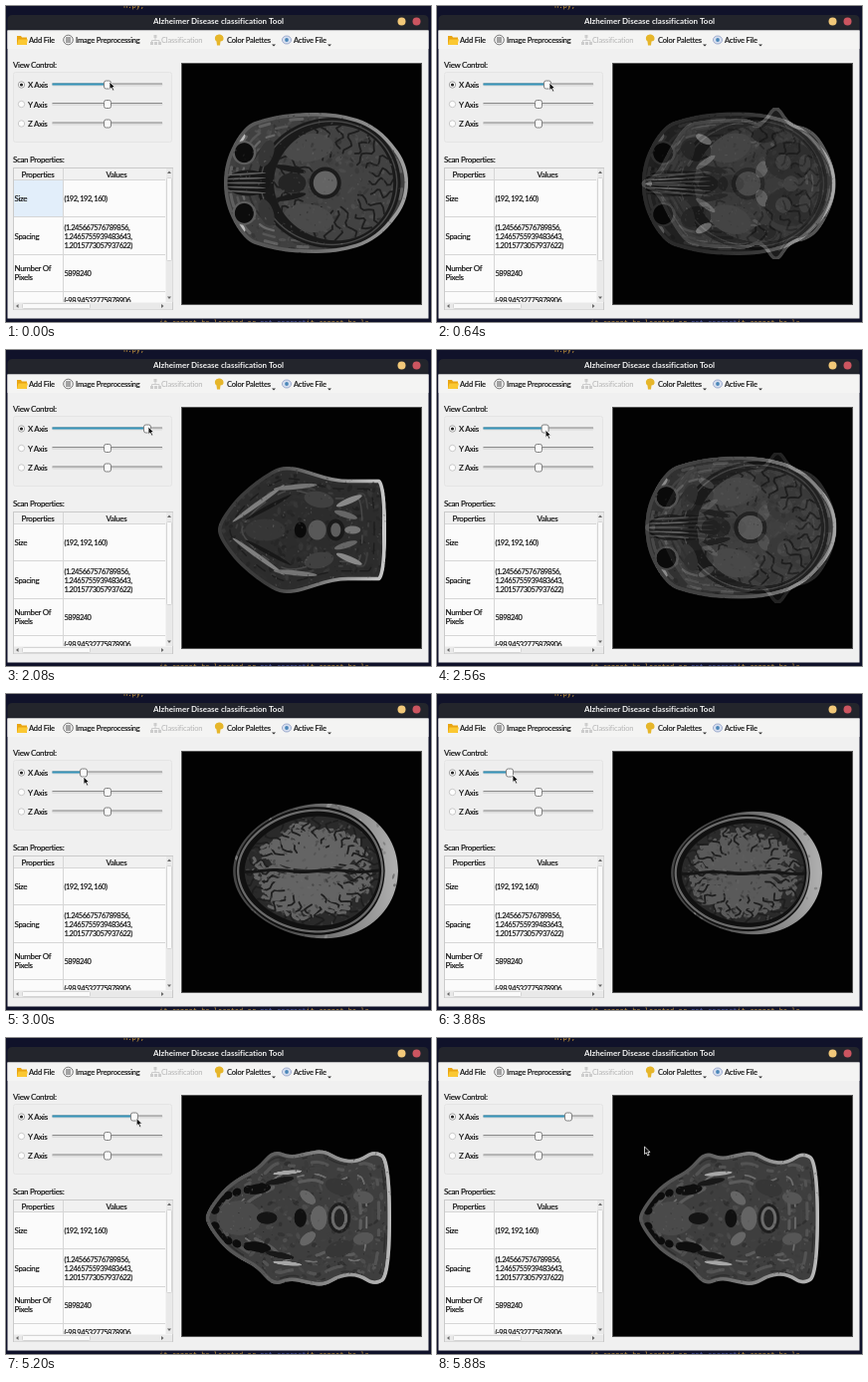
An HTML page with a canvas for the animation above (5.92 s loop, 427 px wide and 317 px high).

```html
<!DOCTYPE html>
<html lang="en">
<head>
<meta charset="utf-8">
<title>Classification tool</title>
<style>
html, body { margin: 0; width: 100%; height: 100%; overflow: hidden; background: #0c0e1f; }
svg, canvas { position: absolute; left: 0; top: 0; display: block; }
#scan { left: 177px; top: 58px; }
text { font: 500 8px Lato, sans-serif; letter-spacing: -.35px; fill: #161616; stroke: #161616; stroke-width: .15px; white-space: pre; }
.bar text { font-size: 7.5px; letter-spacing: -.17px; }
.num text { font-size: 7.5px; letter-spacing: -.5px; }
.term text { font: 7px 'DejaVu Sans Mono', monospace; fill: #c9983c; stroke: none; letter-spacing: 0; }
text.title { font: bold 8px Lato, sans-serif; fill: #f4f4f4; stroke: none; letter-spacing: .03px; }
text.off { fill: #b9b9b9; stroke: none; }
</style>
</head>
<body>
<svg width="427" height="317" viewBox="0 0 427 317">
  <defs><clipPath id="cells"><rect x="8" y="163" width="152" height="134"/></clipPath></defs>

  <rect width="427" height="317" fill="#10122a"/>
  <g class="term">
    <text x="118" y="2">n.py;</text>
    <text x="154" y="319.500">it cannot be located or<tspan fill="#5560b0"> not correct</tspan>it cannot be lo</text>
  </g>

  <path d="M1.500 26V14q0-5 5-5H419.500q5 0 5 5V26z" fill="#23252c"/>
  <rect x="1.500" y="24.500" width="423" height="289" fill="#f0f0f0"/>
  <text class="title" x="213.500" y="18.300" text-anchor="middle">Alzheimer Disease classification Tool</text>
  <circle cx="397.500" cy="15.500" r="4" fill="#f2c879"/>
  <circle cx="412.500" cy="15.500" r="4" fill="#cc5560"/>

  <g class="bar">
    <rect x="1.500" y="24.500" width="423" height="18.500" fill="#f4f4f3"/>
    <path d="M11 30h4l1 1.500h5v7.500h-10z" fill="#e9a512"/>
    <path d="M11 39l1.500-5.500h9.500l-1.500 5.500z" fill="#fbc832"/>
    <text x="23" y="37.300">Add File</text>
    <circle cx="62.500" cy="34" r="4.800" fill="#f2f2f2" stroke="#777"/>
    <path d="M60 32h5M60 34h5M60 36h5" stroke="#555"/>
    <text x="70" y="37.300">Image Preprocessing</text>
    <path d="M150 30v4M146.500 37.500v-3h7.500v3" fill="none" stroke="#cdcdcd"/>
    <path d="M148.500 29h3v3h-3zM145 36h3v3h-3zM149 36h3v3h-3zM153 36h3v3h-3z" fill="#cdcdcd"/>
    <text class="off" x="156" y="37.300">Classification</text>
    <path d="M210 31q1-3 5-2.500q4 1 3.500 5q-.5 2-3 2l-.5 4h-3l-.5-4q-2-1-1.500-4.500z" fill="#e6b62a"/>
    <text x="222" y="37.300">Color Palettes</text>
    <path d="M267 38.500h4l-2 2zM323 38.500h4l-2 2z" fill="#333"/>
    <ellipse cx="282" cy="34" rx="4.500" ry="4" fill="#d8e0f0" stroke="#8c9cc4" stroke-width=".8"/>
    <circle cx="282" cy="34" r="1.900" fill="#4a86b8"/>
    <text x="289" y="37.300">Active File</text>
  </g>

  <text x="7" y="62.300">View Control:</text>
  <rect x="7.500" y="66.500" width="159" height="70" rx="2" fill="#eee" stroke="#e4e4e4"/>
  <g id="axes"></g>

  <text x="7" y="157">Scan Properties:</text>
  <rect x="7.500" y="162.500" width="160" height="142" fill="#fbfbfb" stroke="#cacaca"/>
  <rect x="8" y="163" width="152" height="11.500" fill="#f1f1f1"/>
  <rect id="pick" x="8" y="175" width="49" height="36.500" fill="#e2eefa"/>
  <g clip-path="url(#cells)">
    <path d="M8 174.500H160M8 211.500H160M8 249.500H160M8 286.500H160M57.500 163V297M160.500 163V297" stroke="#d6d6d6"/>
    <text x="15.500" y="171.500">Properties</text>
    <text x="100.500" y="171.500">Values</text>
    <text x="8.500" y="195.800">Size</text>
    <text x="8.500" y="233.600">Spacing</text>
    <text x="8.500" y="266">Number Of</text>
    <text x="8.500" y="275.300">Pixels</text>
    <g class="num">
      <text x="58.500" y="195.800">(192, 192, 160)</text>
      <text x="58.500" y="224.800">(1.245667576789856,</text>
      <text x="58.500" y="234">1.2465755939483643,</text>
      <text x="58.500" y="243.200">1.2015773057937622)</text>
      <text x="58.500" y="270.800">5898240</text>
      <text x="58.500" y="298">(-98.94532775878906,</text>
    </g>
  </g>
  <path d="M160.500 163h7v134h-7zM8 297.500h159v7H8z" fill="#e9e9e9"/>
  <rect x="161.500" y="172.500" width="5" height="83" rx="1" fill="#fafafa" stroke="#d4d4d4"/>
  <rect x="16.500" y="298.500" width="68" height="5" rx="1" fill="#fafafa" stroke="#d4d4d4"/>
  <path d="M162 168l2-2.500 2 2.500zM162 291.500l2 2.500 2-2.500zM12.500 299l-2.500 2 2.500 2zM156 299l2.500 2-2.500 2z" fill="#666"/>
  <rect x="176.500" y="57.500" width="241" height="242" stroke="#555"/>
</svg>
<canvas id="scan" width="240" height="241"></canvas>
<svg id="arrow" width="9" height="12" viewBox="-1 -1 9 12">
  <path d="M0 0V7.500L1.800 6 3.200 9 4.600 8.400 3.300 5.500H5.600Z" fill="#111" stroke="#f2f2f2" stroke-width=".8"/>
</svg>
<script>
const LOOP = 5920, STEP = 40, LEFT = 177, TOP = 58, RES = 2, PAD = 4, TAU = Math.PI * 2;
const byId = id => document.getElementById(id);
const mix = (a, b, k) => a + (b - a) * k;
const clamp = k => Math.min(1, Math.max(0, k));

byId('axes').innerHTML = ['X', 'Y', 'Z'].map((name, i) => `
  <g transform="translate(0 ${79 + i * 19.5})">
    <circle cx="15.500" r="3.200" fill="#fdfdfd" stroke="${i ? '#c4c4c4' : '#999'}" stroke-width=".9"/>
    <circle cx="15.500" r="1.600" fill="${i ? 'none' : '#222'}"/>
    <text x="22" y="3">${name} Axis</text>
    <rect x="46" y="-1.500" width="111.500" height="3" rx="1.500" fill="#dcdcdc"/>
    <path d="M46.500 -1H157" stroke="#8a8a8a"/>
    <path class="fill" d="M46.500 -.5h${i ? 0 : 55}" stroke="#3593b8" stroke-width="2"/>
    <rect class="knob" x="98.500" y="-4" width="7" height="8" rx="2" fill="#fafafa" stroke="#808080"/>
  </g>`).join('');

// Drawing space of one slice: x from 0 to w, y from -h/2 to h/2
let g, w, h, seed;
function rnd(a, b) {
  seed = (seed * 16807) % 2147483647;
  return mix(a, b, seed / 2147483647);
}
const gray = v => `rgb(${v | 0},${v | 0},${v | 0})`;
function fade(v0, v1) {
  const c = g.createLinearGradient(0, 0, w, 0);
  c.addColorStop(.3, gray(v0));
  c.addColorStop(1, gray(v1));
  return c;
}
const ink = c => typeof c === 'number' ? gray(c) : c;
function fill(p, c) { g.fillStyle = ink(c); g.fill(p); }
function line(p, c, width) { g.strokeStyle = ink(c); g.lineWidth = width; g.stroke(p); }
function inside(p, f) { g.save(); g.clip(p); f(); g.restore(); }
function pair(f) {
  f();
  g.save();
  g.scale(1, -1);
  f();
  g.restore();
}
function smooth(pts) {
  const p = new Path2D(), n = pts.length;
  const mid = i => [0, 1].map(d => (pts[i % n][d] + pts[(i + 1) % n][d]) / 2);
  p.moveTo(...mid(0));
  for (let i = 1; i <= n; i++) p.quadraticCurveTo(...pts[i % n], ...mid(i));
  p.closePath();
  return p;
}
// Mirrored outline from half heights at even steps
function outline(prof, inset = 0) {
  const n = prof.length - 1;
  const top = prof.map((v, i) => [mix(inset, w - inset, i / n), -v * (h / 2 - inset)]);
  return smooth([...top, ...top.map(([x, y]) => [x, -y]).reverse()]);
}
function egg(u0, u1, v, taper = .1) {
  const rx = (u1 - u0) * w / 2, pts = [];
  for (let a = 0; a < TAU; a += TAU / 48) {
    pts.push([u0 * w + rx + rx * Math.cos(a), v * h / 2 * Math.sin(a) * (1 + taper * Math.cos(a))]);
  }
  return smooth(pts);
}
function oval(x, y, rx, ry, c, turn = 0) {
  const p = new Path2D();
  p.ellipse(x, y, rx, ry, turn, 0, TAU);
  fill(p, c);
}
const core = (u, rx, ry, c) => oval(u * w, 0, rx, ry, c);
const twin = (u, v, rx, ry, c, turn) => pair(() => oval(u * w, -v * h / 2, rx, ry, c, turn));

function grain(n, lo, hi, size) {
  g.globalAlpha = .5;
  for (let i = 0; i < n; i++) {
    oval(rnd(0, w), rnd(-h, h) / 2, rnd(.5, 1.6) * size, rnd(.4, .9) * size, rnd(lo, hi), rnd(0, 3));
  }
  g.globalAlpha = 1;
}
// Broken bands that follow the outline
function layers(prof, from, gap, n, lo, hi) {
  for (let i = 0; i < n; i++) {
    g.setLineDash([rnd(6, 26), rnd(6, 18), rnd(3, 12), rnd(8, 30)]);
    line(outline(prof, from + i * gap), rnd(lo, hi), rnd(1.2, 3.2));
  }
  g.setLineDash([]);
}
// Wavy radial furrows, with optional bright fingers between them
function furrows(u0, u1, v, n, tone) {
  const cx = (u0 + u1) * w / 2, rx = (u1 - u0) * w / 2, ry = v * h / 2;
  const ray = (a, from, to, c, width) => {
    const p = new Path2D();
    for (let k = 0; k <= 1; k += .125) {
      const r = mix(from, to, k), b = a + .08 * Math.sin(k * 10 + a * 7);
      p.lineTo(cx + rx * r * Math.cos(b), ry * r * Math.sin(b));
    }
    line(p, c, width);
  };
  for (let i = 0; i < n; i++) {
    const a = (i + rnd(.35, .65)) * TAU / n, end = rnd(.76, .9);
    if (tone) {
      ray(a, .3, end, tone, 4);
      ray(a + .1, end - .15, end + .03, tone, 3);
    }
    ray(a + TAU / n / 2, rnd(.4, .68), 1, 28, 1.8);
  }
}

function crown(n, tone) {
  const brain = egg(.07, .885, .81);
  fill(egg(0, 1, 1), fade(70, 175));
  inside(egg(0, 1, 1), () => grain(160, 60, 190, 2));
  fill(egg(.015, .92, .95), 14);
  line(egg(.03, .905, .9), 105, 2.2);
  fill(brain, 40);
  inside(brain, () => {
    twin(.47, .3, w * .27, h * .14, tone);
    furrows(.07, .885, .81, n, tone);
    grain(420, 26, 112, 1.5);
    const p = new Path2D();
    for (let x = 0; x < w; x += 4) p.lineTo(x, Math.sin(x / 9));
    line(p, 20, 3);
  });
}

// Soft tissue shared by the lower slices
function tissue(prof, base, rim, f) {
  const skin = outline(prof);
  fill(skin, base);
  inside(skin, () => {
    grain(380, base * .5, base * 1.6, 2.6);
    layers(prof, 6, 6, 5, base * .6, base * 2);
    f();
    line(skin, fade(base * 1.4, rim), 7);
    grain(330, 20, 120, .9);
  });
}

function eyeLevel() {
  tissue([.3, .82, .92, .98, 1, 1, .96, .87, .66, .25], 62, 160, () => {
    fill(egg(.18, .96, .93, .04), 24);
    line(egg(.2, .94, .88, .04), 70, 1.4);
    const brain = egg(.27, .92, .82, .05);
    fill(brain, 64);
    inside(brain, () => {
      grain(300, 40, 92, 2.8);
      furrows(.27, .92, .82, 26);
      twin(.46, .5, 25, 14, 72, -.15);
      twin(.36, .2, 16, 3, 24, .2);
      grain(160, 44, 92, 1.6);
      core(.37, 14, 10, 34);
      core(.55, 16, 16, 26);
      core(.55, 12, 12, 98);
    });
    twin(.08, .62, 8, 4, 185, -.7);
    twin(.11, .43, 12, 12, 92);
    twin(.11, .43, 9.5, 10, 10);
    twin(.23, .42, 7, 14, 52, .35);
    core(.13, 22, 13, 22);
    for (let y = -9; y <= 9; y += 4.5) oval(w * .12, y, 20, .9, 95, y / 150);
  });
}

function noseLevel() {
  const prof = [.04, .12, .55, .84, .88, .9, .9, .92, .82, 1.15, .82, .8, .64, .2];
  tissue(prof, 48, 175, () => {
    twin(.28, .48, 16, 12, 20, .2);
    twin(.46, .5, 22, 14, 60, -.35);
    twin(.32, .62, 9, 4, 165, .5);
    twin(.33, .3, 12, 3, 135, -.6);
    twin(.63, .68, 13, 8, 18);
    twin(.62, .2, 6, 9, 118, .4);
    twin(.76, .32, 25, 20, 26);
    twin(.73, .3, 8, 8, 60);
    twin(.84, .28, 6, 9, 56);
    core(.22, 36, 13, 18);
    for (let y = -9; y <= 9; y += 3.6) oval(w * .19, y, 34, .9, 92, y / 90);
    core(.02, 7, 5, 170);
    core(.46, 14, 9, 30);
    core(.77, 8, 8, 62);
  });
}

function mouthLevel() {
  const prof = [.08, .42, .6, .72, 1, .9, .96, 1, .86, .84, 1, .85];
  tissue(prof, 60, 185, () => {
    core(.18, 22, 17, 72);
    for (let k = .06; k < 1; k += .15) {
      twin(.05 + .27 * k * k, .46 * Math.sqrt(k), 4.5, 3.8, 10, -.6);
    }
    twin(.28, .42, 13, 5, 12, -.15);
    twin(.44, .66, 14, 2, 165, -.1);
    twin(.4, .54, 14, 3, 22, -.2);
    twin(.55, .3, 9, 5, 100, .7);
    twin(.72, .45, 14, 8, 52, .3);
    twin(.85, .3, 10, 6, 84, .2);
    core(.33, 10, 6, 18);
    core(.51, 6, 9, 14);
    core(.61, 8, 12, 98);
    core(.72, 11, 15, 28);
    core(.72, 8, 12, 105);
    core(.72, 5, 9, 34);
  });
}

function neckLevel() {
  const prof = [.1, .45, .68, .86, 1, 1, .93, .85, .8, .8, .8, .8];
  tissue(prof, 42, 200, () => {
    twin(.24, .42, 32, 2.2, 125, -.62);
    twin(.3, .36, 26, 2, 22, -.5);
    twin(.46, .68, 22, 2.5, 115, -.1);
    twin(.6, .48, 15, 8, 62, .2);
    twin(.78, .46, 14, 3, 135, -.4);
    twin(.76, .24, 12, 3, 100, .3);
    core(.28, 20, 11, 52);
    core(.49, 6, 8, 8);
    core(.59, 9, 10, 86);
    core(.7, 9, 11, 24);
    core(.7, 5, 7, 92);
    core(.8, 8, 4, 115);
    oval(w, 0, 4, h * .42, 205);
  });
}

const slices = [
  { at: 73, box: [235, 118, 387, 241], draw: () => crown(26, 88) },
  { at: 78, box: [228, 110, 394, 245], draw: () => crown(30, 98) },
  { at: 102, box: [219, 107, 404, 248], draw: eyeLevel },
  { at: 119.5, box: [193, 106, 397, 252], draw: noseLevel },
  { at: 132, box: [203, 113, 384, 249], draw: mouthLevel },
  { at: 142, box: [213, 117, 382, 244], draw: neckLevel }
];
slices.forEach((s, i) => {
  const [x0, y0, x1, y1] = s.box;
  w = x1 - x0;
  h = y1 - y0;
  seed = 4127 + i * 977;
  s.img = document.createElement('canvas');
  s.img.width = (w + 2 * PAD) * RES;
  s.img.height = (h + 2 * PAD) * RES;
  g = s.img.getContext('2d');
  g.scale(RES, RES);
  g.translate(PAD, PAD + h / 2);
  g.lineCap = g.lineJoin = 'round';
  s.draw();
});

const view = byId('scan').getContext('2d');
function paint(img, alpha, [x0, y0, x1, y1]) {
  if (alpha <= 0) return;
  view.globalAlpha = alpha;
  view.drawImage(img, x0 - PAD - LEFT, y0 - PAD - TOP, x1 - x0 + 2 * PAD, y1 - y0 + 2 * PAD);
}
function showScan(pos) {
  let i = 0;
  while (i < slices.length - 2 && pos > slices[i + 1].at) i++;
  const a = slices[i], b = slices[i + 1], k = clamp((pos - a.at) / (b.at - a.at));
  const box = a.box.map((v, n) => mix(v, b.box[n], k)), blend = clamp((k - .5) * 2 + .5);
  view.globalAlpha = 1;
  view.globalCompositeOperation = 'source-over';
  view.fillStyle = '#020202';
  view.fillRect(0, 0, 240, 241);
  view.globalCompositeOperation = 'lighter';
  paint(a.img, 1 - blend, box);
  paint(b.img, blend, box);
}

// time, slider x, pointer x, pointer y
const moves = [
  [0, 102, 104, 76], [120, 102, 104, 76], [1160, 120, 122, 78], [2080, 142, 143, 77], [3000, 78, 78, 83],
  [3880, 73, 76, 81], [4680, 119, 122, 79], [5360, 132, 134, 81], [5880, 132, 208.5, 109]
];
function pose(t) {
  let i = 0;
  while (i < moves.length - 2 && t > moves[i + 1][0]) i++;
  const a = moves[i], b = moves[i + 1], k = clamp((t - a[0]) / (b[0] - a[0]));
  return a.map((v, n) => mix(v, b[n], k));
}

const knob = document.querySelector('.knob'), bar = document.querySelector('.fill');
const arrow = byId('arrow'), pick = byId('pick'), start = performance.now();
function tick() {
  const t = Math.floor(((performance.now() - start) % LOOP) / STEP) * STEP;
  const [, pos, x, y] = pose(t);
  knob.setAttribute('x', pos - 3.5);
  bar.setAttribute('d', `M46.5 -.5H${pos}`);
  pick.setAttribute('visibility', t < 120 ? 'visible' : 'hidden');
  arrow.style.transform = `translate(${x - 1}px,${y - 1}px)`;
  showScan(pos);
  requestAnimationFrame(tick);
}
tick();
</script>
</body>
</html>
```
